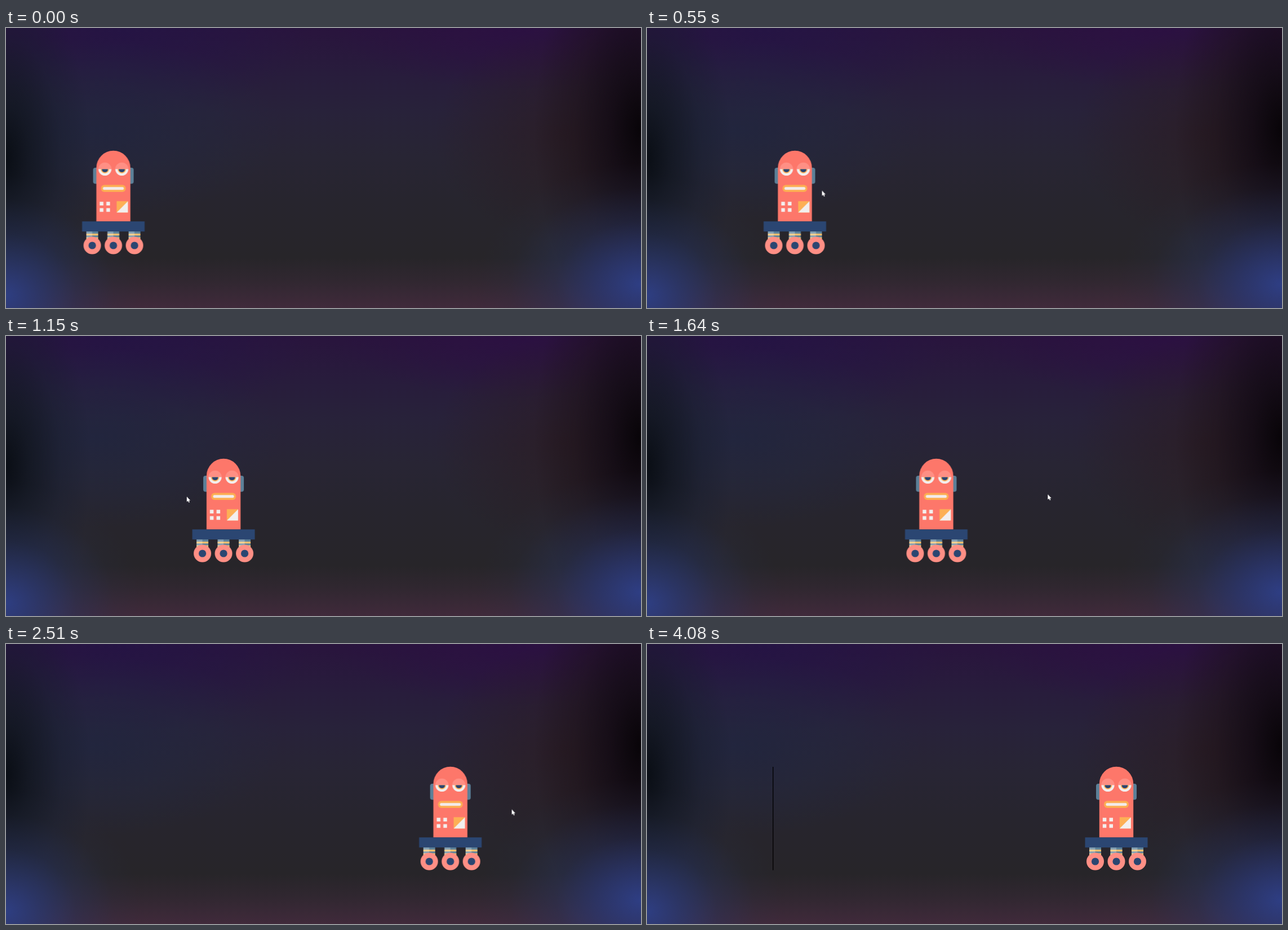
An HTML page that plays this animation: 1127x497 px, repeating every 4.16 s.

```html
<!DOCTYPE html>
<html lang="en">
<head>
<meta charset="utf-8">
<title>Rolling robot</title>
<style>
  html, body { margin: 0; width: 100%; height: 100%; overflow: hidden; background: #272529; }
  #stage {
    position: absolute; left: 0; top: 0; width: 1127px; height: 497px;
    background:
      radial-gradient(ellipse 240px 215px at 0 475px, #2e3e82, #2c3a74c0 25%, #29345f70 52%, #28304c20 80%, #28304c00),
      radial-gradient(ellipse 290px 215px at 1127px 455px, #2e3e84, #2c3a78c0 25%, #29345f70 52%, #28304c20 80%, #28304c00),
      radial-gradient(ellipse 150px 330px at 0 230px, #0a0e15, #0f141dc0 28%, #151b2a60 65%, #1a203200),
      radial-gradient(ellipse 190px 380px at 1127px 180px, #080408, #100810c8 28%, #190e1470 62%, #1c101400),
      radial-gradient(ellipse 230px 190px at 990px 190px, #2c1b1fa0, #2c1b1f60 45%, #2c1b1f00),
      radial-gradient(ellipse 330px 160px at 160px 180px, #1f2640b0, #22284070 50%, #22284000),
      radial-gradient(ellipse 320px 110px at 900px 0, #2c1042e0, #2c104280 45%, #2c104200),
      radial-gradient(ellipse 330px 160px at 210px 0, #241446c0, #24144670 50%, #24144600),
      linear-gradient(#29143d, #281c3c 16%, #28223a 30%, #282534 46%, #27252e 62%, #272529 82%, #302730 90%, #402a3b);
  }
  svg { position: absolute; left: 0; top: 0; display: block; }
</style>
</head>
<body>
<div id="stage">
<svg width="1127" height="497" viewBox="0 0 1127 497">
  <defs>
    <g id="eye">
      <circle r="11.8" fill="#ff8f84"/>
      <path d="M-11.5 0a11.5 11.5 0 0 0 23 0z" fill="#f3efee"/>
      <path d="M-7.4 0a7.4 7.4 0 0 0 14.8 0z" fill="#fdb055"/>
      <path d="M-5.5 0a5.5 5.5 0 0 0 11 0z" fill="#2c4570"/>
    </g>
    <g id="wheel">
      <path d="M-10.5 -25h21v14h-21z" fill="#5f8399"/>
      <path d="M-10.5 -21h21v3.2h-21zM-10.5 -14.6h21v3h-21z" fill="#fbc06f"/>
      <path d="M-10.5 -25h10.5v14h-10.5z" fill="#fff" opacity=".25"/>
      <circle r="15.5" fill="#ff8f85"/>
      <circle r="6.6" fill="#2b4671"/>
    </g>
    <path id="button" d="M0 0h6.5v6.5h-6.5z" fill="#f3efee"/>
  </defs>
  <rect id="caret" x="223" y="218" width="1.3" height="183.5" fill="#000"/>
  <!-- The robot is drawn around its vertical axis -->
  <g id="robot">
    <rect x="-36" y="248" width="72" height="28.6" rx="4" fill="#5b8098"/>
    <path d="M-30.2 343.5V248a30.2 30.2 0 0 1 60.4 0V343.5z" fill="#fd776a"/>
    <use href="#eye" x="-15" y="250.5"/>
    <use href="#eye" x="15" y="250.5"/>
    <rect x="-22" y="278.6" width="44" height="12.4" rx="6" fill="#fdad52"/>
    <rect x="-18.5" y="282.3" width="37" height="5" rx="2" fill="#f3ebea"/>
    <use href="#button" x="-24.2" y="308.5"/>
    <use href="#button" x="-12.5" y="308.5"/>
    <use href="#button" x="-24.2" y="319.8"/>
    <use href="#button" x="-12.5" y="319.8"/>
    <rect x="5.8" y="307.4" width="20" height="20" fill="#fdb055"/>
    <path d="M25.8 307.4v20h-20z" fill="#f3efee"/>
    <use href="#wheel" x="-37.5" y="386"/>
    <use href="#wheel" x="0" y="386"/>
    <use href="#wheel" x="37.5" y="386"/>
    <rect x="-55.5" y="343.3" width="111" height="17.9" fill="#2b4672"/>
  </g>
  <g id="pointer">
    <path d="M0 0V9.4L2.1 7.5 3.6 10.8 5.2 10.1 3.8 6.9H6.4z" fill="#fff" stroke="#15131a" stroke-width=".6" paint-order="stroke"/>
  </g>
</svg>
</div>
<script>
const LOOP = 4160;
const POINTER_IN = 70, POINTER_OUT = 3670;
const CARET_ON = 3000, BLINK = 535;

const byId = id => document.getElementById(id);
const robot = byId('robot'), pointer = byId('pointer'), caret = byId('caret');
const show = (el, on) => { el.style.visibility = on ? 'visible' : 'hidden'; };
const at = (x, y) => `translate(${x}px, ${y}px)`;

// The robot is already rolling when the loop begins.
const roll = robot.animate(
  { transform: [at(174, 0), at(833, 0)] },
  { duration: 3000, delay: -367, easing: 'ease-in', fill: 'both' }
);

// Each stop: time, x, y of the pointer's tip.
const stops = [
  [POINTER_IN, 982, 478], [550, 310.5, 288.5], [1150, 320, 285], [1640, 711, 281],
  [2050, 815, 281], [2510, 898, 293.5], [2860, 749, 277], [3000, 749, 277],
  [3340, 982, 389], [POINTER_OUT, 1127, 497]
];
const span = POINTER_OUT - POINTER_IN;
const wander = pointer.animate(
  stops.map(([time, x, y]) => ({ offset: (time - POINTER_IN) / span, transform: at(x, y) })),
  { duration: span, delay: POINTER_IN, fill: 'both' }
);

const motions = [roll, wander];
motions.forEach(motion => motion.pause());

function draw(t) {
  motions.forEach(motion => { motion.currentTime = t; });
  show(pointer, t >= POINTER_IN && t < POINTER_OUT);
  show(caret, t >= CARET_ON && Math.floor((t - CARET_ON) / BLINK) % 2 === 0);
}

const start = performance.now();
function loop() {
  draw((performance.now() - start) % LOOP);
  requestAnimationFrame(loop);
}
draw(0);
requestAnimationFrame(loop);
</script>
</body>
</html>
```
